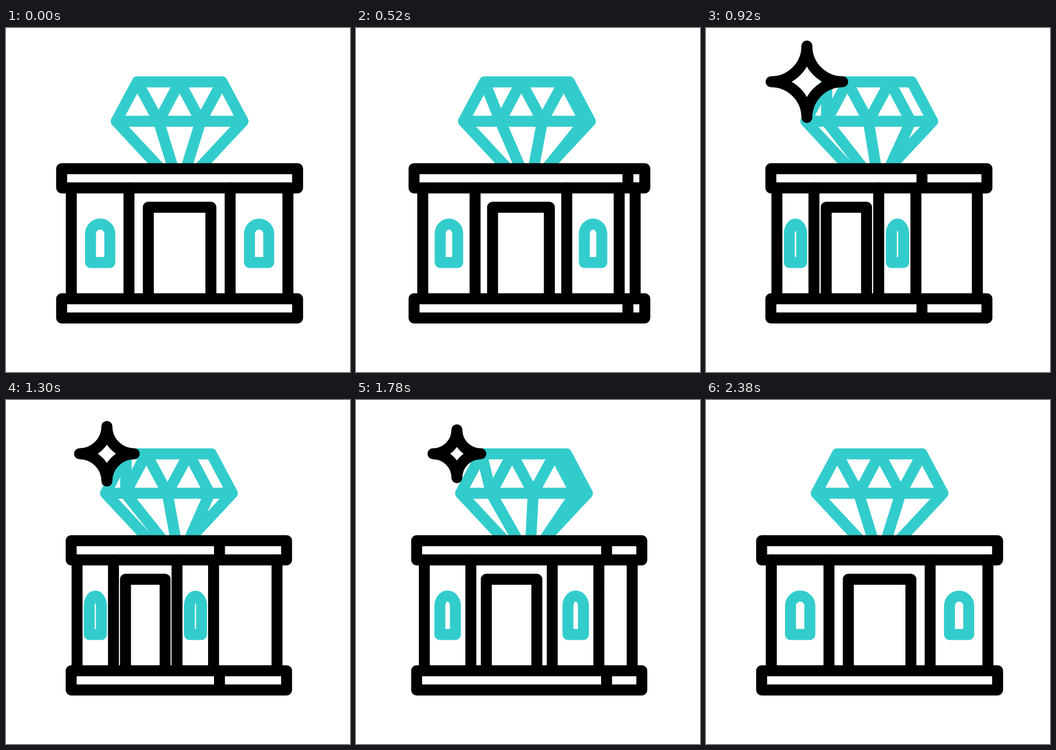
Animation of 640x640 px, one loop 2400 ms. Source, as an HTML page:

```html
<!DOCTYPE html>
<html lang="en">
<head>
<meta charset="utf-8">
<title>Jewelry shop</title>
<style>
  html, body { margin: 0; width: 100%; height: 100%; overflow: hidden; background: #fff; }
  svg { display: block; width: 100%; height: 100%; }
  path { fill: none; stroke: #000; stroke-width: 20.4; stroke-linejoin: round; stroke-linecap: round; }
  .teal { stroke: #3cc; }
  #bands { fill: #fff; }
</style>
</head>
<body>
<svg viewBox="0 0 640 640">
  <path id="gem" class="teal"/>
  <path id="bands"/>
  <path id="walls" stroke-linecap="butt"/>
  <path id="windows" class="teal"/>
  <path id="star"/>
</svg>
<script>
const LOOP = 2400, HALF = 1190;
const STAR = [[573, 0], [890, 68], [1280, 50], [1670, 68], [1988, 0]];
const part = id => document.getElementById(id);
const [gem, bands, walls, windows, star] =
  ['gem', 'bands', 'walls', 'windows', 'star'].map(part);

// Cubic ease with control points (x1, 0) and (x2, 1)
function ease(x, x1 = 0.815, x2 = 0.185) {
  let lo = 0, hi = 1, s = 0.5;
  for (let i = 0; i < 24; i++) {
    s = (lo + hi) / 2;
    const v = 3 * (1 - s) * s * ((1 - s) * x1 + s * x2) + s ** 3;
    if (v < x) lo = s; else hi = s;
  }
  return s * s * (3 - 2 * s);
}

const line = (...pts) => 'M' + pts.map(p => p.join(' ')).join('L');
const column = x => line([x, 297.5], [x, 503.7]);
const box = (l, r, y) => `M${l} ${y}H${r}v35.8H${l}Z`;

function arch(l, r) {
  return `M${l} 436.3V383A${(r - l) / 2} 18.2 0 0 1 ${r} 383V436.3Z`;
}

function drawGem(p) {
  const top = 100.3, mid = 173.5, tip = 300, cut = 0.7;
  const edge = x => x - 20 * p;      // outline
  const facet = x => x - 62.3 * p;   // cut lines on the turning face
  const down = (x, apex) =>
    line([x, mid], [x + (apex - x) * cut, mid + (tip - mid) * cut]);
  const [l, r, tl, tr] = [205, 441, 244.2, 402].map(edge);
  const [a, b, c] = [284, 362.3, 441].map(facet);
  gem.setAttribute('d', [
    line([l, mid], [tl, top], [tr, top], [r, mid], [l, mid]),
    line([tl, top], [a, mid], [facet(323), top], [b, mid], [facet(402), top], [c, mid]),
    down(l, edge(323)), down(r, edge(323)),
    ...[a, b, c].map(x => down(x, 323))
  ].join(''));
}

function drawShop(p) {
  const at = (from, by) => from + by * p;
  const l = at(103.5, 17.8), r = at(542.5, -20.6), corner = at(542.5, -146);
  bands.setAttribute('d', [261.7, 503.7].map(y =>
    box(l, r, y) + line([corner, y], [corner, y + 35.8])).join(''));

  const dl = at(264.8, -42.7), dr = at(381.2, -85.6);
  const columns = [[121.5, 10.8], [228.8, -29], [417, -99.3], [524.5, -139], [524.5, -20.4]];
  walls.setAttribute('d', columns.map(c => column(at(...c))).join('') +
    line([dl, 503.7], [dl, 333.5], [dr, 333.5], [dr, 503.7]));

  windows.setAttribute('d',
    arch(at(157.2, -2.3), at(193.2, -15.8)) +
    arch(at(453, -112.3), at(488.8, -125.6)));
}

function starSize(t) {
  for (let i = 1; i < STAR.length; i++) {
    const [t0, v0] = STAR[i - 1], [t1, v1] = STAR[i];
    if (t >= t0 && t < t1) return v0 + (v1 - v0) * (t - t0) / (t1 - t0);
  }
  return 0;
}

function drawStar(R) {
  const arc = (x, y) => `a${R} ${R} 0 0 0 ${x * R} ${y * R}`;
  star.setAttribute('d', R > 0
    ? `M187.7 ${100 - R}` + arc(1, 1) + arc(-1, 1) + arc(-1, -1) + arc(1, -1) + 'Z'
    : '');
}

function draw(now) {
  const t = now % LOOP;
  const p = ease(Math.max(0, 1 - Math.abs(t - HALF) / HALF));
  drawGem(p);
  drawShop(p);
  drawStar(starSize(t));
}

let start;
function tick(now) {
  start ??= now;
  draw(now - start);
  requestAnimationFrame(tick);
}
draw(0);
requestAnimationFrame(tick);
</script>
</body>
</html>
```
